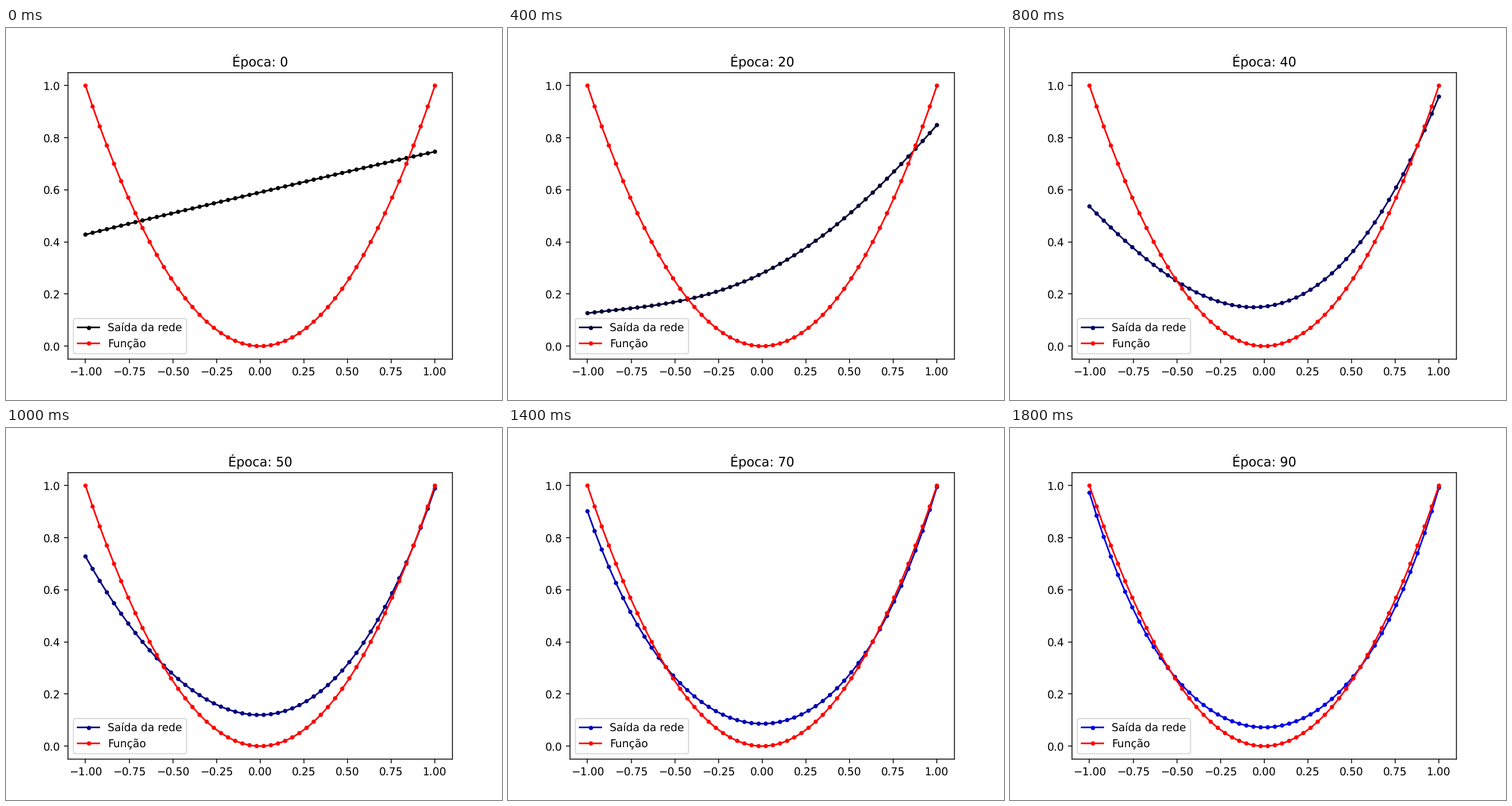
A matplotlib script that plays this animation: 864 px wide and 648 px high, repeating every 2 s.

```python
import numpy as np
import matplotlib.pyplot as plt
from matplotlib.animation import FuncAnimation

STEP = 10      # epochs per frame
FRAMES = 10

# Smooth, unsnapped rendering of text and edges
plt.rcParams.update({"text.hinting": "none", "path.snap": False})

x = np.linspace(-1, 1, 50)


def network(t):
    """Network response at epoch t: a quartic whose terms evolve on their own."""
    r = t / 42
    level = 0.0625 + 0.528 * np.exp(-t / 22.5)
    tilt = 0.37 * (1 - 0.57 * np.exp(-t / 5)) * np.exp(-(t / 35.5) ** 4)
    bowl = 0.69 * min(1, t / 44) ** 1.3
    skew = 0.138 * (r * np.exp(1 - r)) ** 7
    flat = 0.23 / (1 + np.exp((59 - t) / 10)) - 0.06 * np.exp(-((t - 30) / 18) ** 2)
    return level + tilt * x + bowl * x**2 + skew * x**3 + flat * x**4


def dotted_curve(y, color):
    """Line with round dots; per-dot sizes keep the dots off the pixel grid."""
    line, = ax.plot(x, y, color=color)
    dots = ax.scatter(x, y, s=np.full(x.size, 16), color=color,
                      linewidths=0, zorder=line.get_zorder())
    return line, dots


fig, ax = plt.subplots(figsize=(6.4, 4.8), dpi=135)
net = dotted_curve(network(0), "black")
goal = dotted_curve(x**2, "red")
legend = ax.legend([net, goal], ["Saída da rede", "Função"],
                   loc="lower left", scatteryoffsets=[0.5])
# Legend artists that follow the network's colour
keys = [a for a in legend.findobj(lambda a: isinstance(a, (type(net[0]), type(net[1]))))][:2]
title = ax.set_title("Época: 0")
ax.set_xlim(ax.get_xlim())
ax.set_ylim(ax.get_ylim())


def update(i):
    epoch = STEP * i
    y = network(epoch)
    line, dots = net
    line.set_ydata(y)
    dots.set_offsets(np.column_stack([x, y]))
    for artist in (line, dots, *keys):
        artist.set_color((0, 0, epoch / 100))
    title.set_text(f"Época: {epoch}")
    return line, dots, title, legend


anim = FuncAnimation(fig, update, frames=FRAMES, interval=200,
                     repeat=True, repeat_delay=0)
plt.show()
```
